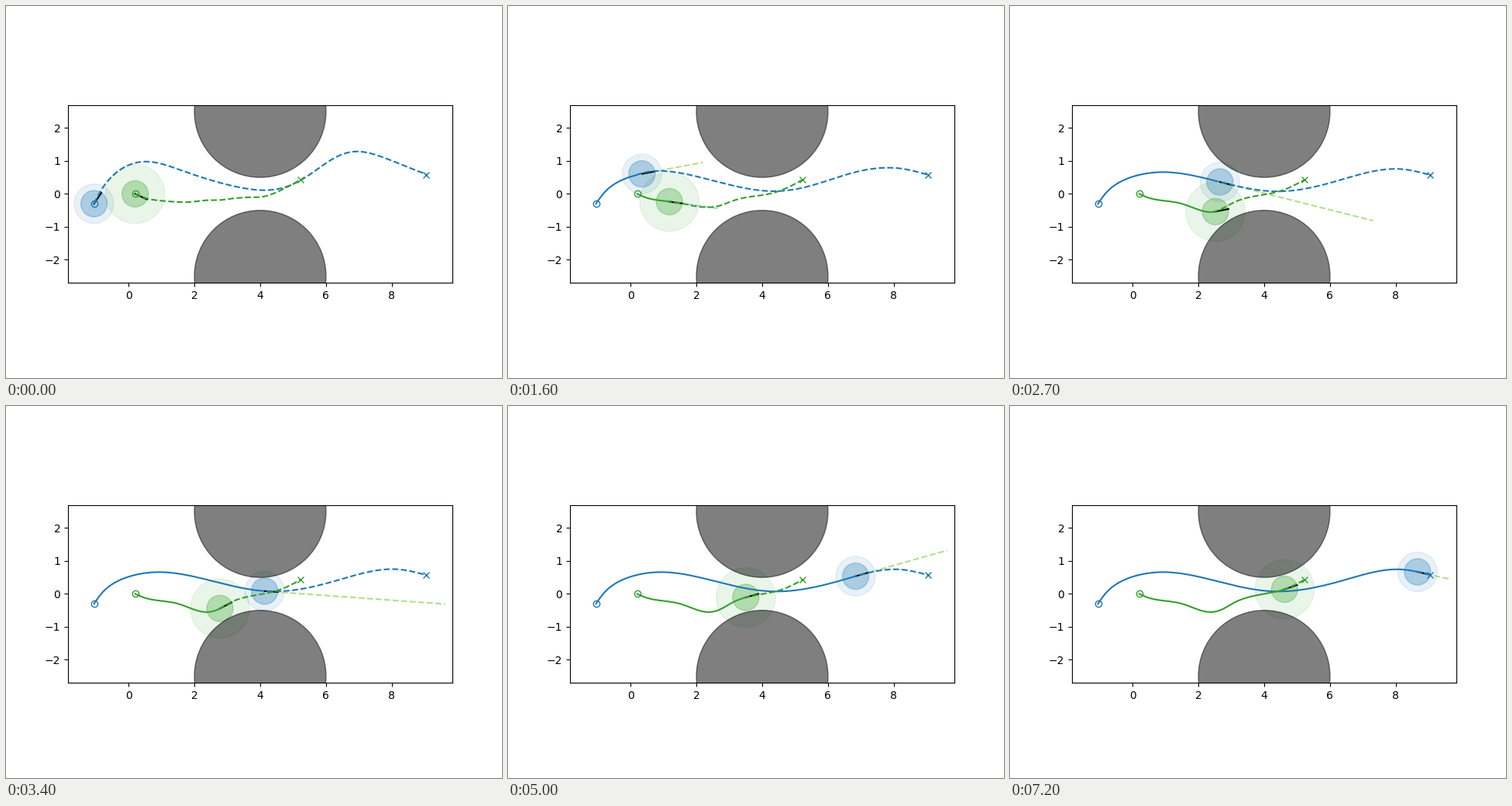
A matplotlib script for the animation above (7300 ms loop, 640x480 px).

```python
import numpy as np
import matplotlib.pyplot as plt
from matplotlib.animation import FuncAnimation
from matplotlib.patches import Circle

FRAMES = 73
X_LIMIT = 9.62
BLUE, GREEN = "#1f78b4", "#33a02c"
PALE_BLUE, PALE_GREEN = "#a6cee3", "#b2df8a"


def spline(t, v, at):
    """Natural cubic spline through (t, v), evaluated at the given places."""
    t, v, at = (np.asarray(a, float) for a in (t, v, at))
    n, h = len(t), np.diff(t)
    slope = np.diff(v) / h
    m, rhs = np.eye(n), np.zeros(n)
    for i in range(1, n - 1):
        m[i, i - 1:i + 2] = h[i - 1], 2 * (h[i - 1] + h[i]), h[i]
        rhs[i] = 6 * (slope[i] - slope[i - 1])
    c = np.linalg.solve(m, rhs)
    i = np.clip(np.searchsorted(t, at, side="right") - 1, 0, n - 2)
    d = at - t[i]
    b = slope[i] - h[i] * (2 * c[i] + c[i + 1]) / 6
    return v[i] + b * d + c[i] / 2 * d**2 + (c[i + 1] - c[i]) / (6 * h[i]) * d**3


def curve(points):
    x, y = np.array(points).T
    u = np.concatenate([[0], np.cumsum(np.hypot(np.diff(x), np.diff(y)))])
    at = np.linspace(0, u[-1], 800)
    return spline(u, x, at), spline(u, y, at)


fig = plt.figure(figsize=(6.4, 4.8), dpi=100)
ax = fig.add_subplot()
ax.set_aspect("equal")
ax.set_xlim(-1.84, 9.84)
ax.set_ylim(-2.7, 2.7)


class Robot:
    def __init__(self, color, pale, margin, points, timing, detours, decay,
                 reach, blind=(), passed=FRAMES):
        self.px, self.py = curve(points)
        self.angle = np.unwrap(np.arctan2(np.gradient(self.py), np.gradient(self.px)))
        self.x = spline(*zip(*timing), np.arange(FRAMES))
        self.detours, self.decay = detours, decay
        self.reach, self.blind, self.passed = reach, blind, passed

        self.discs = [ax.add_patch(Circle((0, 0), r, color=color, alpha=a))
                      for r, a in ((margin, .1), (.4, .3))]
        self.guess, = ax.plot([], [], "--", color=pale, zorder=2)
        self.nose, = ax.plot([], [], color="k", zorder=2.1)
        self.trail, = ax.plot([], [], color=color, zorder=2.2)
        self.plan, = ax.plot([], [], "--", color=color, zorder=2.3)
        for i, mark in ((0, "o"), (-1, "x")):
            ax.plot(self.px[i], self.py[i], mark, color=color,
                    fillstyle="none", zorder=2.4)

    def height(self, x):
        return np.interp(x, self.px, self.py)

    def planned(self, frame, start):
        """The path ahead plus bumps that fade as the plan improves."""
        xs = np.linspace(start, self.px[-1], 400)
        bump = sum(h * np.exp(-((xs - c) / w)**2) for c, w, h in self.detours)
        bump -= bump[0] * np.exp(-(xs - start) / .4)
        return xs, self.height(xs) + bump * np.exp(-frame / self.decay)

    def update(self, frame):
        x, last = self.x[frame], self.x[max(frame - 1, 0)]
        y, angle = self.height(x), np.interp(x, self.px, self.angle)
        dx, dy = np.cos(angle), np.sin(angle)

        def ray(length):
            return [x, x + length * dx], [y, y + length * dy]

        for disc in self.discs:
            disc.center = x, y
        done = self.px < last
        self.trail.set_data(np.append(self.px[done], last),
                            np.append(self.py[done], self.height(last)))
        self.nose.set_data(*ray(.4))
        length = min(np.interp(frame, *zip(*self.reach)), (X_LIMIT - x) / dx)
        self.guess.set_data(*(ray(length) if 0 < frame < self.passed else ([], [])))
        self.plan.set_data(*(([], []) if frame in self.blind
                             else self.planned(frame, last)))


# detours: (centre, width, height); timing: (frame, x); reach: (frame, length)
robots = [
    Robot(BLUE, PALE_GREEN, .6,
          points=[(-1.05, -.3), (-.74, .1), (.1, .55), (.98, .66), (2.66, .36),
                  (4.3, .075), (6.4, .41), (8.2, .74), (9.05, .57)],
          timing=[(0, -1.05), (8, -.74), (16, .345), (27, 2.655),
                  (42, 5.63), (58, 7.73), (72, 8.66)],
          detours=[(.2, 1.3, .37), (6.6, 1.35, .77)], decay=9,
          reach=[(8, 1.95), (16, 1.88), (27, 4.8), (36, 6)],
          blind=range(3, 11)),
    Robot(GREEN, PALE_BLUE, .9,
          points=[(.2, 0), (.46, -.11), (1.5, -.3), (2.45, -.55), (2.68, -.49),
                  (3.08, -.27), (3.95, -.01), (4.62, .14), (5.23, .43)],
          timing=[(0, .2), (8, .46), (16, 1.18), (27, 2.52), (33, 2.75),
                  (42, 3.08), (58, 3.95), (72, 4.62)],
          detours=[(2.4, .65, .36), (4.1, .5, -.1)], decay=18,
          reach=[(8, 2), (16, 1.5)], passed=26),
]

for side in (1, -1):
    ax.add_patch(Circle((4, 2.5 * side), 2, color="k", alpha=.5))


def update(frame):
    for robot in robots:
        robot.update(frame)
    return []


anim = FuncAnimation(fig, update, frames=FRAMES, interval=100,
                     init_func=lambda: update(0), repeat=True)
plt.show()
```
